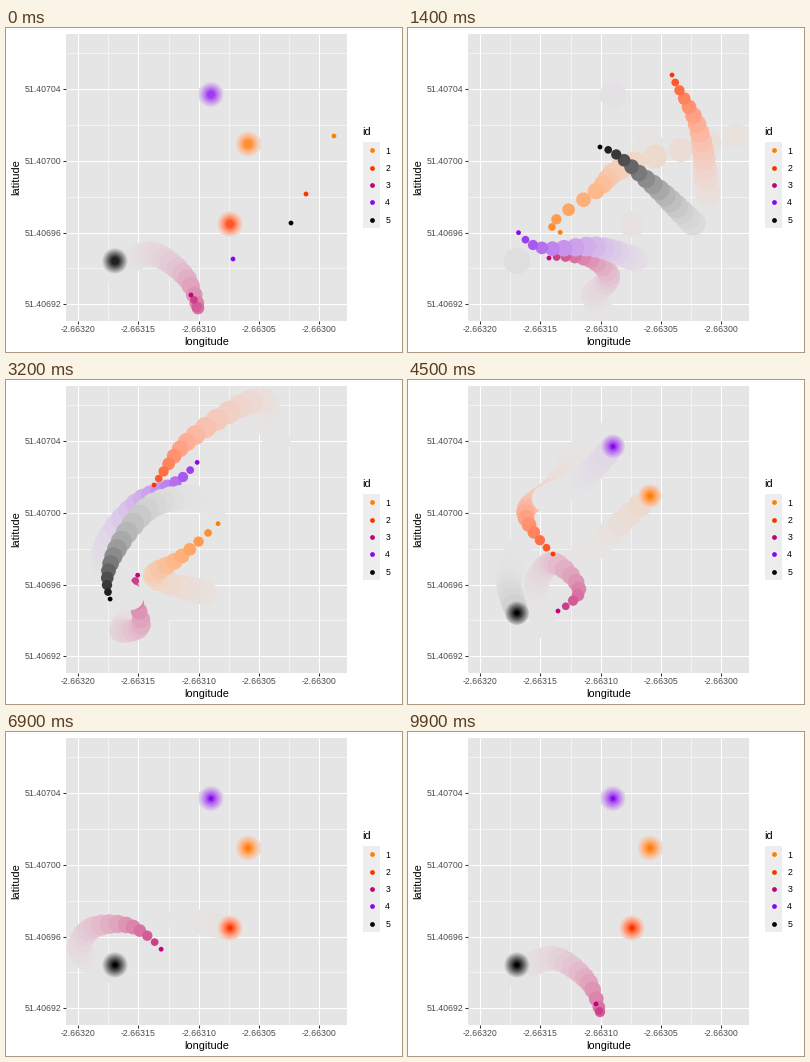
These frames come from a looping animation (396x324 px, 10000 ms). A matplotlib script:

```python
import numpy as np
import matplotlib.pyplot as plt
from matplotlib.animation import FuncAnimation
from matplotlib.colors import to_rgb
from matplotlib.patches import Rectangle

W, H, DPI = 396, 324, 72
FRAMES, INTERVAL, WAKE = 100, 100, 20
R_HEAD, R_TAIL = 2.4, 13
LEFT, TOP, RIGHT, BOTTOM = 60, 6, 340.5, 293
GREY = "#E5E5E5"

# Per id: colour and a few turning points (frame, x, y)
TRACKS = [
    ("#FF7F00", [(0, 328, 108), (4, 226, 135), (9, 188, 163), (13, 144, 199),
                 (17, 198, 212), (23, 148, 196), (28, 176, 176), (35, 242, 116)]),
    ("#FF3300", [(0, 300, 166), (8, 289, 96), (14, 264, 47), (18, 258, 21),
                 (26, 181, 62), (32, 148, 105), (40, 118, 138), (45, 145, 174),
                 (55, 224, 196)]),
    ("#C4007C", [(0, 185, 267), (5, 201, 247), (9, 183, 232), (14, 141, 230),
                 (20, 115, 250), (25, 135, 245), (30, 128, 207), (36, 146, 183),
                 (42, 170, 215), (45, 150, 231), (50, 108, 239), (55, 74, 219),
                 (59, 83, 198), (65, 127, 195), (72, 161, 238), (76, 131, 261),
                 (81, 113, 243), (87, 146, 226), (93, 181, 251), (98, 191, 279),
                 (99, 188, 272)]),
    ("#8A08F0", [(0, 227, 231), (6, 188, 219), (12, 125, 217), (17, 98, 180),
                 (24, 130, 124), (30, 177, 97), (34, 205, 66.5)]),
    ("#000000", [(0, 285, 195), (8, 238, 151), (14, 192, 119), (19, 148, 125),
                 (25, 111, 169), (30, 101, 205), (34, 109, 233)]),
]


def trace(keys):
    """Smooth path through the turning points, resting on the last one."""
    t, *axes = np.array(keys, float).T
    f = np.minimum(np.arange(FRAMES), t[-1])
    i = np.clip(np.searchsorted(t, f, side="right") - 1, 0, len(t) - 2)
    h = t[i + 1] - t[i]
    u = (f - t[i]) / h
    out = []
    for p in axes:
        m = np.gradient(p, t)
        out.append((1 + 2 * u) * (1 - u) ** 2 * p[i] + u * (1 - u) ** 2 * h * m[i]
                   + u * u * (3 - 2 * u) * p[i + 1] + u * u * (u - 1) * h * m[i + 1])
    return np.column_stack(out)


RGB_XYZ = np.array([[0.4124, 0.3576, 0.1805],
                    [0.2126, 0.7152, 0.0722],
                    [0.0193, 0.1192, 0.9505]])
WHITE = RGB_XYZ.sum(axis=1)


def to_lab(color):
    c = np.array(to_rgb(color))
    c = np.where(c > 0.04045, ((c + 0.055) / 1.055) ** 2.4, c / 12.92)
    q = RGB_XYZ @ c / WHITE
    x, y, z = np.where(q > 0.008856, np.cbrt(q), 7.787 * q + 16 / 116)
    return np.array([116 * y - 16, 500 * (x - y), 200 * (y - z)])


def from_lab(lab):
    fy = (lab[0] + 16) / 116
    q = np.array([fy + lab[1] / 500, fy, fy - lab[2] / 200])
    q = np.where(q > 0.2069, q ** 3, (q - 16 / 116) / 7.787)
    c = np.clip(np.linalg.solve(RGB_XYZ, q * WHITE), 0, 1)
    c = np.where(c > 0.0031308, 1.055 * c ** (1 / 2.4) - 0.055, 12.92 * c)
    return np.clip(c, 0, 1)


def fade(color):
    a, b = to_lab(GREY), to_lab(color)
    return [from_lab(a + (b - a) * k) for k in strength]


colors = [c for c, _ in TRACKS]
paths = [trace(keys) for _, keys in TRACKS]

# Oldest first; cubic falloff of both size and colour
ages = np.arange(WAKE, 0, -1)
strength = (1 - ages / (WAKE + 1)) ** 3
wake_r = R_TAIL + (R_HEAD - R_TAIL) * strength
radii = np.append(np.tile(wake_r, len(paths)), [R_HEAD] * len(paths))
faces = np.vstack([fade(c) for c in colors] + [to_rgb(c) for c in colors])

plt.rcParams["font.family"] = "Liberation Sans"
fig = plt.figure(figsize=(W / DPI, H / DPI), dpi=DPI, facecolor="white")
ax = fig.add_axes([0, 0, 1, 1])
ax.set(xlim=(0, W), ylim=(H, 0))
ax.axis("off")


def box(x, y, w, h, color):
    return ax.add_patch(Rectangle((x, y), w, h, color=color, lw=0, zorder=0))


def line(x, y, color="white", lw=1.07):
    ax.plot(x, y, color=color, lw=lw, solid_capstyle="butt", zorder=1)


def label(x, y, s, size=8.8, color="black", **kw):
    ax.text(x, y, s, fontsize=size, color=color, va="baseline", **kw)


panel = box(LEFT, TOP, RIGHT - LEFT, BOTTOM - TOP, GREY)
across, down = [LEFT, RIGHT], [TOP, BOTTOM]
x0, dx, y0, dy = 72.2, 60.25, 276.2, -71.65

for i in range(4):
    x, y = x0 + dx * (i + 0.5), y0 + dy * (i + 0.5)
    line([x, x], down, lw=0.53)
    line(across, [y, y], lw=0.53)
for i in range(5):
    x = x0 + dx * i
    line([x, x], down)
    line([x, x], [BOTTOM, BOTTOM + 2.75], "#333333")
    label(x, 303.7, f"{-2.6632 + 0.00005 * i:.5f}", color="#4D4D4D", ha="center")
for i in range(4):
    y = y0 + dy * i
    line(across, [y, y])
    line([LEFT - 2.75, LEFT], [y, y], "#333333")
    label(55.2, y + 3, f"{51.40692 + 0.00004 * i:.5f}", color="#4D4D4D", ha="right")
label((LEFT + RIGHT) / 2, 316.7, "longitude", 11, ha="center")
label(13.5, (TOP + BOTTOM) / 2, "latitude", 11, ha="center",
      rotation=90, rotation_mode="anchor")

key = 17.28
label(356.6, 106.8, "id", 11)
box(357.2, 113.8, key, key * len(colors), "#EDEDED")
for i, c in enumerate(colors):
    y = 113.8 + key * (i + 0.5)
    ax.scatter([365.9], [y], s=(2 * R_HEAD) ** 2, color=c, lw=0)
    label(379.2, y + 3.1, str(i + 1))

blank = np.zeros(len(radii))
dots = ax.scatter(blank, blank, s=(2 * radii) ** 2, c=faces, lw=0, zorder=2)
dots.set_clip_path(panel)


def update(frame):
    past = (frame - ages) % FRAMES
    dots.set_offsets(np.vstack([p[past] for p in paths] + [p[frame] for p in paths]))
    return (dots,)


anim = FuncAnimation(fig, update, frames=FRAMES, interval=INTERVAL,
                     repeat=True, repeat_delay=0, blit=False)
plt.show()
```
